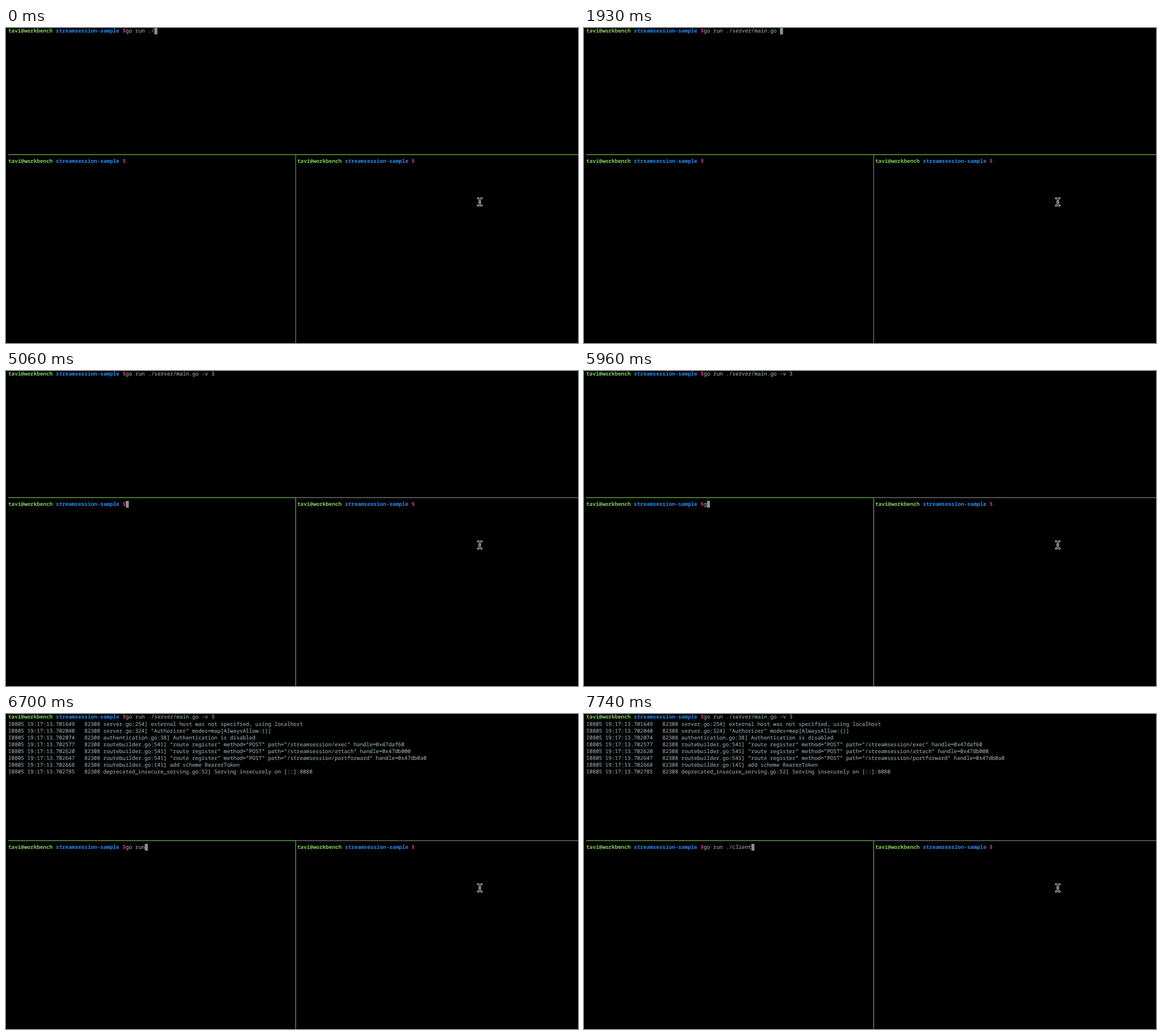
Animation of 1007x556 px, one loop 8000 ms. Source, as an HTML page:

```html
<!DOCTYPE html>
<html lang="en">
<head>
<meta charset="utf-8">
<title>Terminal session</title>
<style>
  html, body { margin: 0; width: 100%; height: 100%; overflow: hidden; background: #000; }
  svg { display: block; width: 100vw; height: 100vh; }
  text {
    font: 9.318px "Noto Sans Mono", "DejaVu Sans Mono", monospace;
    fill: #8a9b9c;
    stroke: #8a9b9c;
    stroke-width: .22px;
    white-space: pre;
    text-rendering: geometricPrecision;
  }
  .bold { font-weight: 700; stroke: none; }
  .user { fill: #84d15c; }
  .dir { fill: #268bee; }
  .sign { fill: #e0358a; }
</style>
</head>
<body>
<svg id="stage" viewBox="0 0 1007 556">
  <rect width="1007" height="556"/>
  <g id="borders" fill="none" stroke-width="1.4"></g>
  <g id="screen"></g>
  <rect id="cursor" width="5.3" height="12" fill="#839496"/>
  <g id="pointer" fill="none" stroke-linecap="square"></g>
</svg>
<script>
const LOOP = 8000;
const CELL_W = 5.591, CELL_H = 12.1, LEFT = 4, TOP = -0.7, BASELINE = 9.1;
const GREEN = '#5f9e41', GREY = '#69726f';
const PROMPT_COLS = 37, LOWER_ROW = 19, RIGHT_COL = 91;
const SWITCH_AT = 5060, ENTER_AT = 3260, LOG_AT = 6700;

const byId = id => document.getElementById(id);
const colX = col => LEFT + col * CELL_W;
const rowY = row => TOP + row * CELL_H;

function add(parent, tag, attrs, content = '') {
  const node = document.createElementNS('http://www.w3.org/2000/svg', tag);
  for (const key in attrs) node.setAttribute(key, attrs[key]);
  node.textContent = content;
  return parent.appendChild(node);
}

const screen = byId('screen');

function write(col, row, content, cls = '', parent = screen) {
  return add(parent, 'text', { x: colX(col), y: rowY(row) + BASELINE, class: cls }, content);
}

function prompt(col, row) {
  write(col, row, 'tavi@workbench', 'bold user');
  write(col + 15, row, 'streamsession-sample', 'bold dir');
  write(col + 36, row, '$', 'bold sign');
}

prompt(0, 0);
prompt(0, LOWER_ROW);
prompt(RIGHT_COL, LOWER_ROW);

const serverLine = write(PROMPT_COLS, 0, '');
const clientLine = write(PROMPT_COLS, LOWER_ROW, '');

const route = (name, handle) =>
  `routebuilder.go:541] "route register" method="POST" path="/streamsession/${name}" handle=0x47d${handle}`;

const log = add(screen, 'g', {});
[
  ['1649', 'server.go:254] external host was not specified, using localhost'],
  ['2040', 'server.go:324] "Authorizer" modes=map[AlwaysAllow:{}]'],
  ['2074', 'authentication.go:38] Authentication is disabled'],
  ['2577', route('exec', 'af60')],
  ['2620', route('attach', 'b000')],
  ['2647', route('portforward', 'b0a0')],
  ['2668', 'routebuilder.go:141] add scheme BearerToken'],
  ['2785', 'deprecated_insecure_serving.go:52] Serving insecurely on [::]:8080']
].forEach(([micros, message], i) =>
  write(0, i + 1, `I0805 19:17:13.70${micros}   82308 ${message}`, '', log));

const borders = byId('borders');
const midX = colX(90.5), midY = 223.5;
const rightBorder = add(borders, 'path', { d: `M${midX} ${midY}H1007` });
const sideBorder = add(borders, 'path', { d: `M${midX} ${midY}V556` });
add(borders, 'path', { d: `M${LEFT} ${midY}H${midX}`, stroke: GREEN });

// Text pointer: a white outline with a dark core.
const beam = 'M831 300.6Q834.1 300.6 834.1 303.2V310.8Q834.1 313.4 831 313.4' +
  'M837.2 300.6Q834.1 300.6 834.1 303.2M834.1 310.8Q834.1 313.4 837.2 313.4M833.5 307H834.7';
for (const [stroke, width] of [['#fff', 2.9], ['#000', 1.1]])
  add(byId('pointer'), 'path', { d: beam, stroke, 'stroke-width': width });

// Each entry: time in ms, number of characters visible from then on.
const SERVER = 'go run ./server/main.go -v 3';
const serverKeys = [
  [0, 9], [140, 10], [290, 11], [440, 12], [590, 16], [1330, 17], [1480, 18],
  [1930, 24], [2670, 25], [2820, 26], [2970, 27], [3110, 28]
];
const CLIENT = 'go run ./client';
const clientKeys = [
  [0, 0], [5960, 1], [6110, 3], [6410, 4], [6550, 5], [6700, 6], [6850, 7],
  [7000, 8], [7150, 9], [7290, 10], [7440, 11], [7590, 13], [7740, 15]
];

const typed = (keys, t) => keys.filter(([at]) => at <= t).pop()[1];

function cursorCell(t, serverCount, clientCount) {
  if (t >= SWITCH_AT) return [PROMPT_COLS + clientCount, LOWER_ROW];
  if (t >= ENTER_AT) return [0, 1];
  return [PROMPT_COLS + serverCount, 0];
}

const cursor = byId('cursor');

function render(t) {
  const serverCount = typed(serverKeys, t);
  const clientCount = typed(clientKeys, t);
  serverLine.textContent = SERVER.slice(0, serverCount);
  clientLine.textContent = CLIENT.slice(0, clientCount);
  log.setAttribute('visibility', t >= LOG_AT ? 'visible' : 'hidden');

  const lowerActive = t >= SWITCH_AT;
  rightBorder.setAttribute('stroke', lowerActive ? GREY : GREEN);
  sideBorder.setAttribute('stroke', lowerActive ? GREEN : GREY);

  const [col, row] = cursorCell(t, serverCount, clientCount);
  cursor.setAttribute('x', colX(col));
  cursor.setAttribute('y', rowY(row));
}

const start = performance.now();
function tick() {
  render((performance.now() - start) % LOOP);
  requestAnimationFrame(tick);
}
tick();
</script>
</body>
</html>
```
